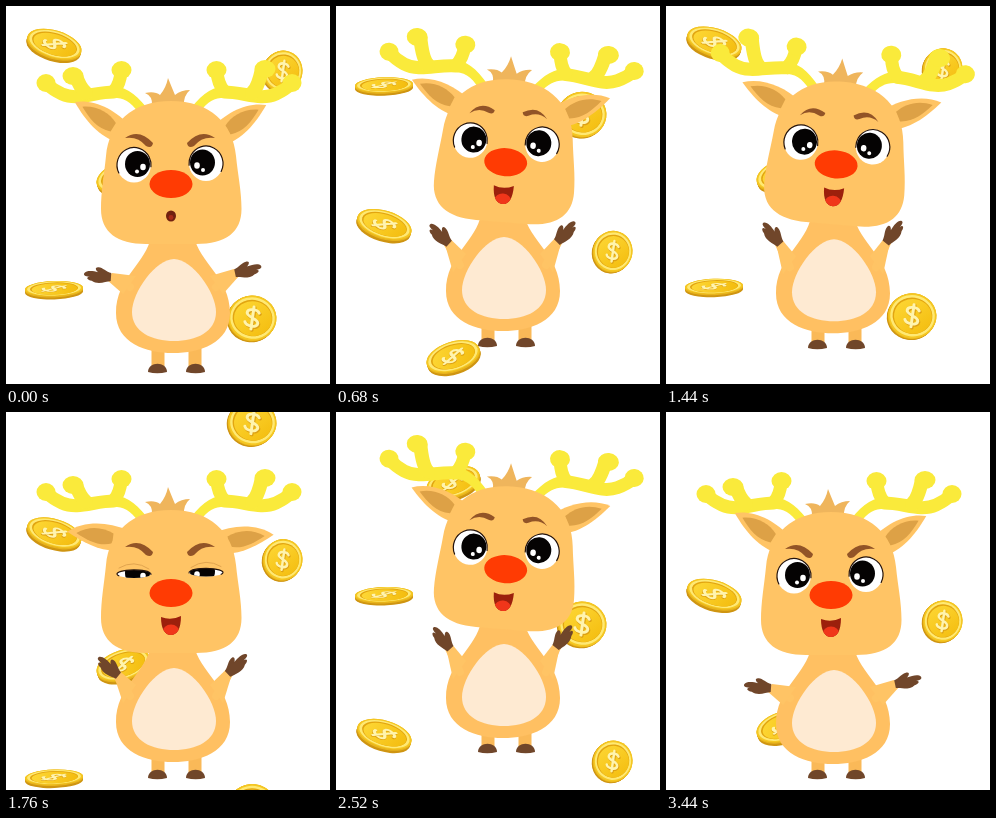
An HTML page with a canvas that plays this animation: 324x378 px, repeating every 3480 ms.

```html
<!DOCTYPE html>
<html lang="en">
<head>
<meta charset="utf-8">
<title>Jumping reindeer and falling coins</title>
<style>
html, body { margin: 0; width: 100%; height: 100%; overflow: hidden; background: #fff; }
canvas { display: block; width: 324px; height: 378px; }
</style>
</head>
<body>
<canvas id="stage" width="324" height="378"></canvas>
<script>
const ctx = document.getElementById('stage').getContext('2d');
const LOOP = 3480, STEP = 40, TAU = Math.PI * 2;
const FALL = 0.2651, TILE = 384, TILES = 3;
const SKIN = '#ffc465', ANTLER = '#faea3b', BROWN = '#70462a', BROW = '#925427';

// time, feet, body, head tilt, arm lift, ear lift
const POSES = [
  [0, 0, 0, 0, 0, 32],
  [200, 0, 8, 0, .4, 20],
  [340, 0, 13, 3, .6, 14],
  [420, 0, 10, 4, .7, 16],
  [540, -26, -22, 5, .7, 22],
  [680, -26, -22, 4.5, .6, 23],
  [840, 0, 3, 1, .6, 12],
  [1000, 0, 13, 1, .9, 9],
  [1160, 0, 12, 3.5, .55, 14],
  [1340, 0, 8, 4, .6, 16],
  [1460, -26, -22, 5, .7, 22],
  [1620, -26, -21, 4, .7, 22],
  [1760, 0, 3, 0, .55, 7],
  [1920, 0, 13, 0, .9, 9],
  [2100, 0, 12, 3.5, .6, 14],
  [2260, 0, 8, 4, .6, 16],
  [2380, -26, -22, 5, .7, 22],
  [2520, -26, -21, 4.5, .7, 22],
  [2680, 0, 3, 1, .8, 12],
  [2840, 0, 12, 0, 1, 8],
  [3360, 0, 5, 0, 0, 32],
  [3480, 0, 5, 0, 0, 32]
];

// centre, radii, tilt, rim offset, turn of the sign
const COINS = [
  { x: 48.5, y: 38, rx: 28, ry: 13.5, tilt: 17, rim: 4, turn: 50 },
  { x: 277, y: 65, rx: 19.5, ry: 20.5, tilt: 8, rim: 2, side: -1.5 },
  { x: 117, y: 170, rx: 27.5, ry: 14.5, tilt: -18, rim: 4, turn: 50 },
  { x: 48, y: 282.5, rx: 29, ry: 7.5, tilt: -2, rim: 3.5, turn: 50 },
  { x: 246.5, y: 312, rx: 24, ry: 22.5, tilt: 8, rim: 2, side: -1.5 }
];

const rad = deg => deg * Math.PI / 180;
const mix = (a, b, k) => a + (b - a) * k;

function poseAt(t) {
  const i = POSES.findIndex((p, n) => n + 1 < POSES.length && t < POSES[n + 1][0]);
  const a = POSES[i], b = POSES[i + 1];
  const u = (t - a[0]) / (b[0] - a[0]), k = u * u * (3 - 2 * u);
  const [, feet, body, tilt, arm, ear] = a.map((v, n) => mix(v, b[n], k));
  return { feet, body, tilt, arm, ear };
}

function local(x, y, angle, draw) {
  ctx.save();
  ctx.translate(x, y);
  ctx.rotate(rad(angle));
  draw();
  ctx.restore();
}

function mirrored(axis, draw) {
  draw(false);
  ctx.save();
  ctx.translate(axis * 2, 0);
  ctx.scale(-1, 1);
  draw(true);
  ctx.restore();
}

function shape(d, color) {
  ctx.fillStyle = color;
  ctx.fill(new Path2D(d));
}

function line(d, color, width) {
  ctx.strokeStyle = color;
  ctx.lineWidth = width;
  ctx.lineCap = ctx.lineJoin = 'round';
  ctx.stroke(new Path2D(d));
}

function oval(x, y, rx, ry, color) {
  ctx.fillStyle = color;
  ctx.beginPath();
  ctx.ellipse(x, y, rx, ry, 0, 0, TAU);
  ctx.fill();
}

function drawCoin({ x, y, rx, ry, tilt, rim, side = 0, turn = 0 }, top) {
  local(x, y + top, tilt, () => {
    for (let k = 1; k > 0; k -= .2) {
      oval(side * k, rim * k, rx, ry, k > .5 ? '#cf9512' : '#e8b41c');
    }
    const gold = ctx.createLinearGradient(-rx, -ry, rx, ry);
    gold.addColorStop(0, '#ffdc3c');
    gold.addColorStop(1, '#f2b808');
    oval(0, 0, rx, ry, '#f5c722');
    oval(0, 0, rx * .93, ry * .92, '#ffe973');
    oval(0, 0, rx * .83, ry * .81, '#e2a510');
    oval(.5, .5, rx * .79, ry * .77, gold);
    ctx.scale(rx / 24, ry / 24);
    ctx.rotate(rad(turn));
    const sign = 'M6 -6 C4 -10 -6 -10 -6 -5 C-6 0 6 0 6 5 C6 10 -5 10 -7 5 M0 -12 V12';
    ctx.translate(1, 1);
    line(sign, '#dda014', 3.4);
    ctx.translate(-1, -1);
    line(sign, '#fff4ae', 3);
  });
}

function drawCoins(t) {
  for (let n = 0; n < TILES; n++) {
    const top = FALL * t - n * TILE;
    for (const coin of COINS) drawCoin(coin, top);
  }
}

function drawLegs(feet, body) {
  mirrored(170.5, () => {
    const top = 330 + body, foot = 367 + feet;
    ctx.fillStyle = '#fab958';
    ctx.fillRect(145.5, top, 13, foot - 6 - top);
    shape(`M142 ${foot - 1} C142 ${foot - 12} 161 ${foot - 12} 161 ${foot - 1} Q151 ${foot + 1.5} 142 ${foot - 1}`, BROWN);
  });
}

function drawArms(lift) {
  mirrored(167, right => {
    const raise = right ? 4 * (1 - lift) : 0;
    const x = mix(103, 117, lift), y = mix(271, 251, lift) - raise;
    line(`M124 281 L${x} ${y}`, SKIN, 8);
    shape(`M117 288 L${x - 2} ${y + 3} L${x + 3} ${y - 4} L130 270 Z`, SKIN);
    local(x + 1, y, mix(right ? 12 : 4, 68, lift), () => shape(
      'M1 -4 C-4 -5 -8 -9 -12 -9 C-17 -9 -14 -5 -12 -4 C-18 -5 -24 -5 -26 -2 ' +
      'C-27 1 -23 1 -20 1 C-25 2 -22 5 -18 5 C-12 9 -4 5 1 4 Z', BROWN));
  });
}

function drawBody() {
  shape('M145 230 C141 257 110 271 110 307 C110 337 140 347 167 347 ' +
    'C194 347 224 337 224 307 C224 271 193 257 188 230 Z', '#ffc062');
  shape('M168 253 C150 253 126 286 126 306 C126 326 146 335 168 335 ' +
    'C190 335 210 326 210 306 C210 286 186 253 168 253 Z', '#feead2');
}

function drawAntler(prong) {
  shape('M132 106 C124 95 116 91 104 92 L104 80 C118 80 128 86 141 102 Z', ANTLER);
  line('M108 86 C88 86 72 95 56 88 Q47 84 41 78', ANTLER, 13);
  line(`M80 87 Q74 82 70 ${prong}`, ANTLER, 14);
  line('M108 85 Q114 78 115 66', ANTLER, 13);
  oval(40, 77, 9.5, 9, ANTLER);
  oval(67, prong, 10.5, 9, ANTLER);
  oval(115.5, 64, 10, 9, ANTLER);
}

function drawEar(lift, right) {
  local(112, right ? 126 : 123, lift, () => {
    shape('M8 11 C-12 17 -32 10 -51 0 C-36 -13 -12 -15 8 -9 Z', SKIN);
    shape('M-5 6 C-18 11 -30 6 -42 0 C-30 -9 -16 -9 -5 -4 Z', '#dda146');
  });
}

function drawEye(open, right) {
  const x = 128, y = right ? 157.5 : 159, ry = 17.5 * open;
  ctx.save();
  ctx.beginPath();
  ctx.ellipse(x, y, 17, ry, 0, 0, TAU);
  ctx.fillStyle = '#fff';
  ctx.fill();
  ctx.clip();
  oval(x + 3.5, y - 1, 12.5, 13, '#050303');
  oval(x + 9, y + 2, 2.8, 3.2, '#fff');
  oval(x + 3, y + 6.5, 2, 2, '#fff');
  ctx.restore();
  ctx.strokeStyle = '#24130c';
  ctx.lineWidth = 1.2;
  ctx.beginPath();
  ctx.ellipse(x, y, 17, ry, 0, Math.PI * .85, TAU + .1);
  ctx.stroke();
  if (open < .6) line(`M113 ${y - 6} Q128 ${y - 15} 143 ${y - 5}`, '#e1a44f', 1);
}

function drawBrow(happy) {
  const p = (a, b) => mix(a, b, happy).toFixed(1);
  shape(`M${p(119, 125)} ${p(132, 132)} Q${p(133, 135)} ${p(122, 118)} ${p(147, 150)} ${p(137, 127)} ` +
    `Q${p(146, 149)} ${p(143, 132)} ${p(140, 144)} ${p(140, 130)} ` +
    `Q${p(132, 134)} ${p(130, 125)} ${p(119, 125)} ${p(132, 132)}`, BROW);
}

function drawMouth(t) {
  if (t < 120) {
    oval(165, 210, 5, 5.5, '#72200f');
    oval(165, 211.5, 2.4, 2.4, '#a92b18');
    return;
  }
  ctx.save();
  ctx.clip(new Path2D('M155 202 Q165 206 175 201 C175 214 171 220 165 220 C159 220 155 214 155 202 Z'));
  ctx.fillStyle = '#9c200c';
  ctx.fillRect(150, 198, 30, 25);
  oval(165, 217, 8.5, 7.5, '#f0361a');
  ctx.restore();
}

function drawHead(t, pose) {
  const happy = Math.max(0, -pose.feet / 26);
  const open = 1 - .77 * Math.max(0, 1 - Math.abs(t - 1760) / 110);
  mirrored(163, right => drawAntler(right ? 63 : 70 - 2.2 * pose.tilt));
  shape('M146 100 Q147 90 139 87 Q149 85 154 89 Q160 82 162 72 Q166 82 169 89 Q175 84 184 84 Q177 90 178 100 Z', '#efb55c');
  mirrored(164.5, right => drawEar(pose.ear, right));
  shape('M165 95 C126 95 103 117 100 150 C98 170 95 185 95 203 C95 226 111 238 140 238 ' +
    'L190 238 C220 238 235.5 226 235.5 203 C235.5 185 232 170 230 150 C227 117 204 95 165 95 Z', SKIN);
  mirrored(164, right => {
    drawEye(open, right);
    drawBrow(happy);
  });
  oval(165, 178, 21.5, 14, '#ff3b03');
  drawMouth(t);
}

function drawDeer(t) {
  const pose = poseAt(t);
  drawLegs(pose.feet, pose.body);
  local(0, pose.body, 0, () => {
    drawBody();
    local(165, 238, pose.tilt, () => {
      ctx.translate(-165, -238);
      drawHead(t, pose);
    });
    drawArms(pose.arm);
  });
}

const start = performance.now();
function frame() {
  const elapsed = (performance.now() - start) % LOOP;
  const t = Math.floor(elapsed / STEP) * STEP;
  ctx.fillStyle = '#fff';
  ctx.fillRect(0, 0, 324, 378);
  drawCoins(t);
  drawDeer(t);
  requestAnimationFrame(frame);
}
frame();
</script>
</body>
</html>
```
